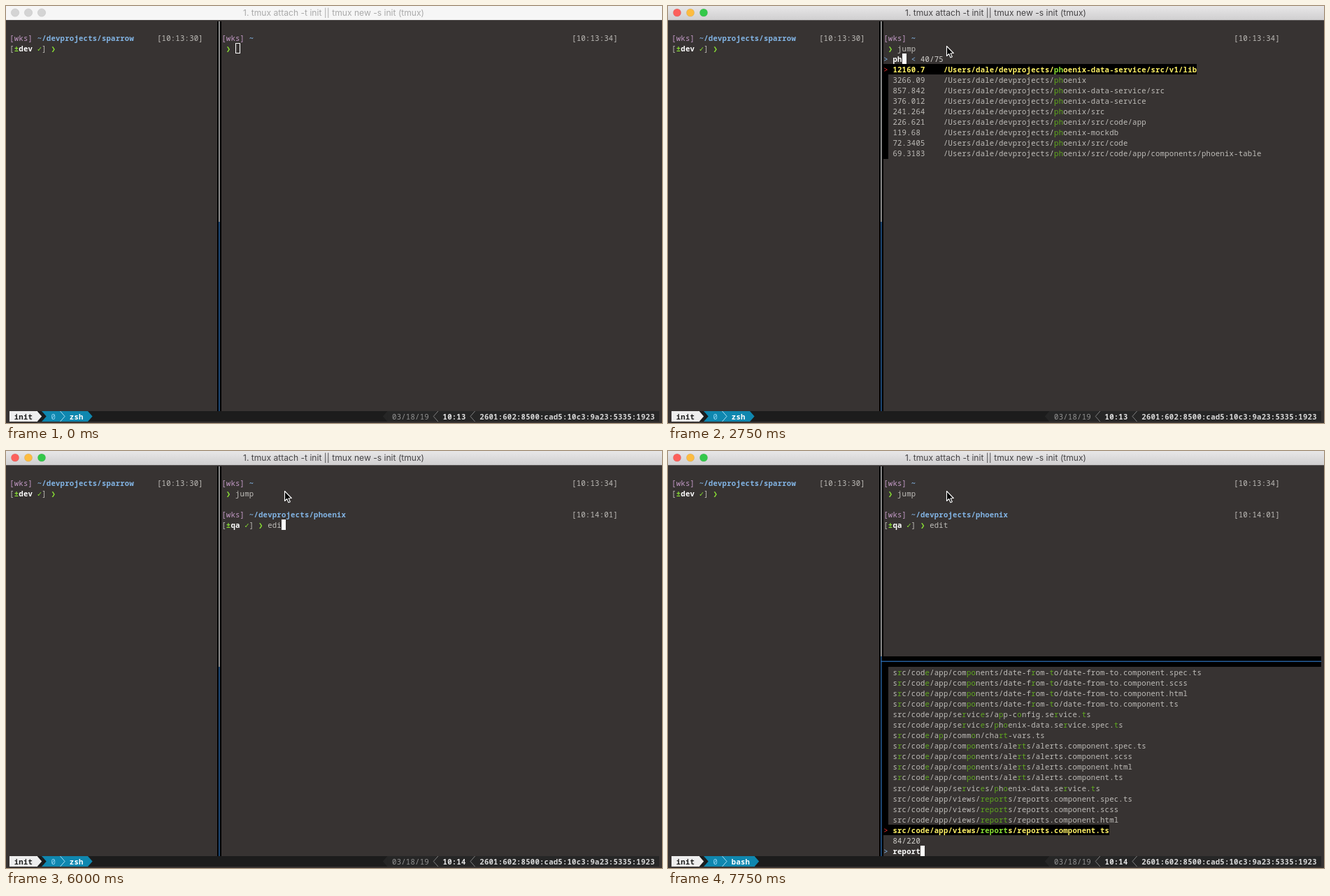
Recreate the animation shown at these times as an HTML page with a canvas. Size 938 px wide and 597 px high, loop 8000 ms.

```html
<!DOCTYPE html>
<html lang="en">
<head>
<meta charset="utf-8">
<title>Terminal session</title>
<style>
html, body { margin: 0; width: 100%; height: 100%; overflow: hidden; background: #373332; }
canvas { display: block; width: 938px; height: 597px; }
</style>
</head>
<body>
<canvas id="stage" width="938" height="597"></canvas>
<script>
const ctx = document.getElementById('stage').getContext('2d');
const LOOP = 8000, W = 938, H = 597;
const CELL = 6.59, LINE = 15.06, LEFT = 5, TOP = 22.9;
const PANE = 46, SPLIT_ROW = 18, STATUS = 37;
const MONO = '"Noto Sans Mono", "DejaVu Sans Mono", monospace';
const C = {
  bg: '#373332', text: '#bfbdb9', white: '#ffffff', green: '#8ae234', hit: '#5fa81e',
  blue: '#82b4e4', purple: '#c39ac6', yellow: '#fdf065', red: '#ef2f2f',
  bar: '#1c1c1c', barRight: '#262626', tab: '#0f87af', line: '#2f74bd'
};

// Asterisks enclose the letters that the finder highlights.
const HOME = '/Users/dale/devprojects/*pho*e*n*ix';
const JUMPS = [
  ['12160.7', '-data-service/src/v1/lib'], ['3266.09', ''], ['857.842', '-data-service/src'],
  ['376.012', '-data-service'], ['241.264', '/src'], ['226.621', '/src/code/app'],
  ['119.68', '-mockdb'], ['72.3405', '/src/code'],
  ['69.3183', '/src/code/app/components/phoenix-table']
].map(([score, tail]) => score.padEnd(11) + HOME + tail);
const OTHERS = [['1841.25', '/Users/dale/devprojects/sparrow'], ['604.19', '/Users/dale/devprojects']]
  .map(([score, path]) => score.padEnd(11) + path);
const ALL_JUMPS = [JUMPS[0], JUMPS[1], OTHERS[0], JUMPS[2], OTHERS[1], ...JUMPS.slice(3, 7)];

const family = stem => ['spec.ts', 'scss', 'html', 'ts'].map(ext => stem + ext);
const APP = 'src/code/app/', IMAGES = 'src/code/assets/images/';
const REPORTS = family(APP + 'views/*report*s/reports.component.');
const COMPONENTS = 's*r*c/cod*e*/app/com*po*nents/';
const DATA = APP + 'se*r*vic*e*s/*p*h*o*enix-data.se*r*vice.';
const FILES = [
  APP + 'common/date-utils.ts', APP + 'common/chart-vars.ts',
  APP + 'common/chart-helpers.spec.ts', APP + 'app.module.ts',
  APP + 'app.component.ts', APP + 'app.component.scss', APP + 'app.component.html',
  APP + 'app-routing.module.ts', 'src/angular.json', 'runme', 'run', 'package.json',
  'README.md', 'Dockerfile', '.gitignore', '.editorconfig'
];
const R_FILES = [
  's*r*c/code/main.ts', 's*r*c/angular.json', 's*r*c/tslint.json', 'Docke*r*file',
  ...REPORTS, IMAGES + '*r*ailOffline.png', IMAGES + '*r*ailOnline.png',
  APP + 'app-*r*outing.module.ts', IMAGES + '*r*ails.png', IMAGES + '*r*ail.png',
  '*R*EADME.md', '*r*unme', '*r*un'
];
const LOOSE = [
  ...family(COMPONENTS + 'date-f*r*om-*t*o/date-from-to.component.'),
  APP + 'se*r*vic*e*s/a*p*p-c*o*nfig.se*r*vice.*t*s',
  DATA + 'spec.*t*s',
  's*r*c/cod*e*/a*p*p/comm*o*n/cha*rt*-vars.ts',
  ...family(COMPONENTS + 'ale*rt*s/alerts.component.'),
  DATA + '*t*s'
];

// Timed states: [start in ms, value, ...]
const POINTER = [[0, null], [250, [469, 19]], [500, [404, 50]], [750, [398, 57]]];
const JUMP_CMD = [[0, ''], [1750, 'ju'], [2000, 'jump']];
const EDIT_CMD = [[0, ''], [5750, 'e'], [6000, 'edi'], [6250, 'edit']];
const JUMP_QUERY = [[2250, ['', 75, ALL_JUMPS]], [2750, ['ph', 40, JUMPS]],
  [3000, ['pho', 38, JUMPS]], [3750, ['phon', 38, JUMPS]]];
const FILE_QUERY = [[7000, ['', 220, FILES]], [7250, ['r', 217, R_FILES]],
  [7500, ['rep', 112, [...LOOSE].reverse().concat(REPORTS)]],
  [7750, ['report', 84, LOOSE.concat(REPORTS)]]];

const pick = (t, steps) => steps.filter(s => s[0] <= t).pop()[1];
const colX = c => LEFT + c * CELL;
const rowY = r => TOP + r * LINE;

function rect(x0, y0, x1, y1, color) {
  ctx.fillStyle = color;
  ctx.fillRect(x0, y0, x1 - x0, y1 - y0);
}

function cells(col, row, n, color) {
  rect(Math.round(colX(col)), Math.round(rowY(row)),
    Math.round(colX(col + n)), Math.round(rowY(row + 1)), color);
}

function put(col, row, str, color = C.text, bold = false) {
  ctx.font = (bold ? 'bold ' : '') + '10.6px ' + MONO;
  ctx.textAlign = 'center';
  ctx.fillStyle = color;
  [...str].forEach((ch, i) => {
    if (ch !== ' ') ctx.fillText(ch, colX(col + i + 0.5), rowY(row) + 11.8);
  });
  return col + str.length;
}

function poly(points, fill, stroke, width = 1) {
  ctx.beginPath();
  points.forEach(([x, y]) => ctx.lineTo(x, y));
  if (fill) { ctx.closePath(); ctx.fillStyle = fill; ctx.fill(); }
  if (stroke) { ctx.strokeStyle = stroke; ctx.lineWidth = width; ctx.stroke(); }
}

function arrow(col, color, dir, thin) {
  const y0 = Math.round(rowY(STATUS)), y1 = y0 + 15;
  const a = colX(dir > 0 ? col : col + 1), b = a + dir * CELL;
  const pts = [[a, y0], [b, (y0 + y1) / 2], [a, y1]];
  thin ? poly(pts, null, color) : poly(pts, color);
}

const cursor = (col, row) => cells(col, row, 1, C.white);

function matchLine(row, str, hits, selected) {
  if (selected) cells(PANE, row, str.replace(/\*/g, '').length + 2, '#000');
  else cells(PANE, row, 1, '#000');
  if (selected) put(PANE, row, '>', C.red);
  let on = false, col = PANE + 2;
  for (const ch of str) {
    if (ch === '*') { on = !on; continue; }
    const hit = on && hits-- > 0;
    const color = selected ? (hit ? C.green : C.yellow) : (hit ? C.hit : C.text);
    col = put(col, row, ch, color, selected);
  }
}

function query(row, str) {
  put(PANE, row, '>', C.blue);
  const end = put(PANE + 2, row, str, C.white, true);
  cursor(end, row);
  return end;
}

function header(col, row, path, timeCol, time) {
  put(col, row, '[wks]', C.purple);
  put(col + 6, row, path, C.blue, true);
  put(timeCol, row, '[' + time + ']');
}

function branch(col, row, name) {
  col = put(col, row, '[');
  col = put(col, row, '±', C.green, true);
  col = put(col, row, name + ' ', C.white, true);
  col = put(col, row, '✓', C.green, true);
  col = put(col, row, '] ');
  return put(col, row, '❯', C.green, true) + 1;
}

function titleBar(active) {
  const shade = ctx.createLinearGradient(0, 0, 0, 20);
  shade.addColorStop(0, active ? '#e8e7e8' : '#f6f6f6');
  shade.addColorStop(1, active ? '#d0cfd0' : '#f6f6f6');
  rect(0, 0, W, 20, shade);
  rect(0, 20, W, 21, active ? '#5c5858' : '#4a4645');
  ['#fc605b', '#fdbc40', '#34c84a'].forEach((color, i) => {
    ctx.beginPath();
    ctx.arc(13 + 19 * i, 9.5, 5.6, 0, Math.PI * 2);
    ctx.fillStyle = active ? color : '#d4d4d4';
    ctx.fill();
    ctx.strokeStyle = active ? 'rgba(0,0,0,.12)' : '#c4c4c4';
    ctx.lineWidth = 0.6;
    ctx.stroke();
  });
  ctx.font = '12.1px Inter, Roboto, sans-serif';
  ctx.textAlign = 'center';
  ctx.fillStyle = active ? '#454345' : '#a9a9a9';
  ctx.fillText('1. tmux attach -t init || tmux new -s init (tmux)', 468.5, 14.3);
}

function dividers(split) {
  const x = 304.3, mid = split ? rowY(SPLIT_ROW) : rowY(SPLIT_ROW + 1);
  rect(302, 22, 308, 580, '#000');
  if (split) {
    cells(45, SPLIT_ROW, 96, '#000');
    rect(x, 300.6, colX(141), 301.8, C.line);
  }
  rect(x, 22, x + 1.2, mid, '#e6e6e6');
  rect(x, mid, x + 1.2, 580, C.line);
}

function statusBar(shell, clock) {
  const r = STATUS, end = 14 + shell.length;
  cells(0, r, 141, C.bar);
  cells(0, r, 6, '#eeeeee');
  put(1, r, 'init', '#1c1c1c', true);
  arrow(6, '#eeeeee', 1);
  cells(7, r, end - 7, C.tab);
  arrow(7, C.bar, 1);
  put(9, r, '0', '#8fd4f2');
  arrow(11, '#a9def5', 1, true);
  put(13, r, shell, C.white, true);
  arrow(end, C.tab, 1);
  cells(82, r, 59, C.barRight);
  arrow(81, C.barRight, -1);
  put(83, r, '03/18/19', '#949494');
  arrow(92, '#808080', -1, true);
  put(94, r, clock, '#e4e4e4', true);
  arrow(100, '#808080', -1, true);
  put(102, r, '2601:602:8500:cad5:10c3:9a23:5335:1923', '#d8d8d8', true);
}

function jumpFinder(t) {
  const [text, count, items] = pick(t, JUMP_QUERY);
  const end = query(3, text);
  put(end + 2, 3, '<', C.blue);
  put(end + 4, 3, count + '/75', '#d4d2ce');
  const chosen = t < 4250 ? 0 : 1;
  items.forEach((item, i) => matchLine(4 + i, item, text.length, i === chosen));
}

function fileFinder(t) {
  const [text, count, items] = pick(t, FILE_QUERY);
  items.forEach((item, i) => matchLine(19 + i, item, text.length, i === items.length - 1));
  put(PANE + 2, 35, count + '/220', '#d4d2ce');
  query(36, text);
}

function rightPane(t) {
  header(PANE, 1, '~', PANE + 76, '10:13:34');
  put(PANE + 1, 2, '❯', C.green, true);
  const end = put(PANE + 3, 2, pick(t, JUMP_CMD));
  if (t < 750) {
    ctx.strokeStyle = C.white;
    ctx.lineWidth = 1;
    ctx.strokeRect(328.5, 53.5, 6, 14);
  } else if (t < 2250) cursor(end, 2);
  else if (t < 4750) jumpFinder(t);
  if (t < 4750) return;

  header(PANE, 4, '~/devprojects/phoenix', PANE + 76, '10:14:01');
  if (t < 5000) return cursor(PANE, 5);
  const edit = put(branch(PANE, 5, 'qa'), 5, pick(t, EDIT_CMD));
  if (t < 6250) cursor(edit, 5);
  else if (t < 6750) cursor(PANE, 6);
  else if (t < 7000) cursor(PANE, 19);
  else fileFinder(t);
}

function pointer(at) {
  if (!at) return;
  const shape = [[0, 0], [0, 14], [3.2, 11], [5.5, 16.2], [7.8, 15.2], [5.6, 10.2], [9.8, 10]];
  ctx.save();
  ctx.translate(at[0] + 0.5, at[1] + 0.5);
  ctx.lineJoin = 'round';
  poly([...shape, shape[0]], '#000', '#fff', 1.1);
  ctx.restore();
}

function draw(t) {
  rect(0, 0, W, H, C.bg);
  titleBar(t >= 750);
  header(0, 1, '~/devprojects/sparrow', 32, '10:13:30');
  branch(0, 2, 'dev');
  dividers(t >= 6750);
  rightPane(t);
  statusBar(t < 7000 ? 'zsh' : 'bash', t < 4500 ? '10:13' : '10:14');
  pointer(pick(t, POINTER));
}

function frame() {
  draw(performance.now() % LOOP);
  requestAnimationFrame(frame);
}
frame();
</script>
</body>
</html>
```
